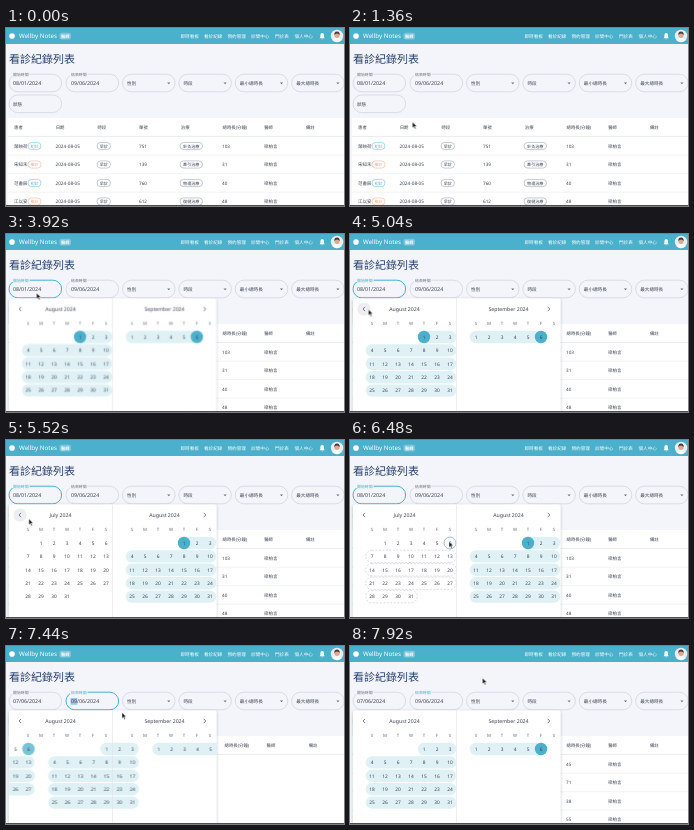
An HTML page that plays this animation: 338x178 px, repeating every 8000 ms.

```html
<!DOCTYPE html>
<html lang="zh-Hant">
<head>
<meta charset="utf-8">
<title>看診紀錄列表</title>
<style>
  html, body { margin: 0; width: 100%; height: 100%; overflow: hidden; background: #f3f5fa; }
  svg { display: block; width: 100vw; height: 100vh; }
  text {
    font: 4.6px "Noto Sans", "Noto Sans CJK TC", "Noto Sans CJK SC", sans-serif;
    fill: #3b4252;
    text-rendering: geometricPrecision;
  }
  .mid { text-anchor: middle; }
  .anim { animation: 8s linear infinite; }

  .popup { animation-name: popup; transform-origin: 106px 64px; }
  @keyframes popup {
    0%, 46.1% { opacity: 0; transform: scale(.75, .56); animation-timing-function: ease-out; }
    49.2%, 100% { opacity: 1; transform: none; }
  }
  /* Month change: 375 ms slide by one panel width */
  .strip { animation-name: strip; }
  @keyframes strip {
    0%, 64% { transform: none; animation-timing-function: cubic-bezier(.35, .8, .4, 1); }
    68.7%, 91.31% { transform: translateX(104px); animation-timing-function: cubic-bezier(.35, .8, .4, 1); }
    96%, 100% { transform: none; }
  }
  .picked { animation-name: picked; }
  @keyframes picked {
    0%, 91.2% { opacity: 0; }
    93%, 94% { opacity: .7; }
    97%, 100% { opacity: 1; }
  }
  .cursor { animation-name: cursor; animation-timing-function: ease-in-out; }
  @keyframes cursor {
    0%, 13% { transform: translate(84px, 154px); }
    17%, 18.5% { transform: translate(62.5px, 94px); }
    23%, 25% { transform: translate(42px, 66px); }
    28%, 31% { transform: translate(39px, 55px); }
    35%, 37% { transform: translate(40px, 55px); }
    40%, 46% { transform: translate(33px, 55px); }
    56% { transform: translate(20px, 76px); }
    59%, 67% { transform: translate(18.5px, 75.5px); }
    71% { transform: translate(27px, 82px); }
    80.5%, 90.5% { transform: translate(99px, 101.5px); }
    93%, 94% { transform: translate(116px, 66.5px); }
    98.5%, 100% { transform: translate(132.5px, 32px); }
  }
</style>
</head>
<body>
<script>
const TEAL = '#4bb0cb', PALE = '#e0f1f6', LINE = '#c6ccd6', NAVY = '#263f6d';
const LOOP = 8000;
let rules = '', ruleCount = 0;

const text = (x, y, s, style = '', cls = '') =>
  `<text x="${x}" y="${y}" class="${cls}" style="${style}">${s}</text>`;
const box = (x, y, w, h, r, attrs) =>
  `<rect x="${x}" y="${y}" width="${w}" height="${h}" rx="${r}" ${attrs}/>`;
const dot = (x, y, r, attrs) => `<circle cx="${x}" cy="${y}" r="${r}" ${attrs}/>`;
const path = (d, attrs) => `<path d="${d}" ${attrs}/>`;
const stroke = (color, w = .6) => `fill="none" stroke="${color}" stroke-width="${w}"`;

// Wraps content so that it shows only from a to b (ms)
function during(a, b, content) {
  const name = 'show' + ruleCount++;
  const pct = t => (t / LOOP * 100).toFixed(2) + '%';
  rules += `@keyframes ${name} {
    0% { opacity: ${a > 0 ? 0 : 1}; }
    ${a > 0 ? `${pct(a)} { opacity: 1; }` : ''}
    ${b < LOOP ? `${pct(b)} { opacity: 0; }` : ''}
    100% { opacity: ${b < LOOP ? 0 : 1}; } }\n`;
  return `<g style="animation: ${name} ${LOOP}ms step-end infinite">${content}</g>`;
}

// Key moments
const HOVER = 2040, FOCUS = 3000, OPEN = 3690, BACK = 5120, PREVIEW = 6360, PICK = 7300, LOADED = 7660;

function header() {
  const nav = [[174.5, '即時看板'], [198, '看診紀錄'], [221.5, '預約管理'],
    [245, '診間中心'], [269, '門診表'], [288.5, '個人中心']];
  const white = 'fill: #fff';
  return box(0, 0, 338, 16, 0, `fill="${TEAL}"`) +
    dot(6, 8, 2.8, 'fill="#fff"') +
    text(13, 10.4, 'Wellby Notes', white + '; font-size: 6.2px') +
    box(53.5, 4.7, 11.5, 6.8, 1.8, 'fill="#fff" fill-opacity=".28"') +
    text(55, 9.6, '醫師', white + '; font-size: 4.2px; font-weight: 700') +
    nav.map(([x, s]) => text(x, 9.8, s, white)).join('') +
    path('M313.6 10.2h5.2l-.8-1.1v-2a1.8 2 0 0 0-3.6 0v2zM315.5 10.7h1.4l-.7.7z', 'fill="#fff"') +
    dot(331, 8, 6.2, 'fill="#e6f0f5"') +
    path('M326.6 12.3q.6-2.6 4.4-2.6t4.4 2.6a6.2 6.2 0 0 1-8.8 0', 'fill="#fff"') +
    dot(331, 7.3, 2.6, 'fill="#dfab8e"') +
    path('M328.3 6.9q-.2-3.5 2.7-3.5t2.7 3.5q-1.2-1.5-2.7-1.5t-2.7 1.5', 'fill="#4a3a38"');
}

const field = (x, y, color = LINE, w = .6) => box(x, y, 52.6, 17.6, 8.8, stroke(color, w));
const label = (x, s, color) =>
  box(x - 1, 44, 17.6, 4, 0, 'fill="#f3f5fa"') + text(x, 48, s, `font-size: 3.9px; fill: ${color}`);
const date = (x, s) => text(x, 57.2, s, 'font-size: 5.3px');

function select(x, s) {
  return field(x, 46.2) + text(x + 4.6, 57, s) +
    path(`M${x + 44.7} 54.6h3.2l-1.6 1.7z`, 'fill="#68707d"');
}

function filters() {
  const start = (color, w) => field(3, 46.2, color, w) + label(7, '開始時間', color === TEAL ? TEAL : '#6b7280');
  const end = (border, color, w) => field(60, 46.2, border, w) + label(65, '結束時間', color);
  return during(0, HOVER, start(LINE)) +
    during(HOVER, FOCUS, start('#59606c')) +
    during(FOCUS, PICK, start(TEAL, 1)) +
    during(PICK, LOOP, start(LINE)) +
    during(0, PICK, end(LINE, '#6b7280') + date(7, '08/01/2024')) +
    during(PICK, LOADED, end(TEAL, TEAL, 1) + box(64.5, 52, 6.8, 6.8, 0, 'fill="#9ec4ec"')) +
    during(LOADED, LOOP, end(LINE, TEAL)) +
    during(PICK, LOOP, date(7, '07/06/2024')) +
    date(65, '09/06/2024') +
    select(116.5, '性別') + select(172.8, '時段') + select(229.2, '最小總時長') + select(285.6, '最大總時長') +
    field(3, 67) + text(7, 77.6, '狀態');
}

function tag(x, y, s, w, color, ink = color) {
  return box(x, y - 3.6, w, 7.2, 3.6, stroke(color, .5)) +
    text(x + w / 2, y + 1.5, s, `font-size: 4.1px; fill: ${ink}`, 'mid');
}

const heads = ['患者', '日期', '時段', '單號', '治療', '總時長(分鐘)', '醫師', '備註'];
const tableHead = step => heads.map((s, i) => text(8 + i * step, 101, s, 'font-size: 4.4px')).join('');

function rows(data) {
  return data.map(([name, first, no, cure, mins], i) => {
    const y = 118 + i * 18.5;
    return text(8, y + 1.6, name, 'font-size: 4.5px') +
      tag(22, y, first ? '初診' : '複診', 13, first ? '#58b4d0' : '#eda98c') +
      text(49.5, y + 1.7, '2024-08-05', 'font-size: 4.7px') +
      tag(91, y, '早診', 13.5, '#8d96a5', '#3b4252') +
      text(133, y + 1.7, no) +
      tag(174, y, cure, 22.5, '#8d96a5', '#3b4252') +
      text(216, y + 1.7, mins) + text(258, y + 1.6, '梁柏言', 'font-size: 4.5px') +
      path(`M2 ${y + 9.2}H338`, stroke('#e3e6ec', .5));
  }).join('');
}

function table() {
  const before = [['葉映荷', 1, 751, '針灸治療', 103], ['宋知禾', 0, 139, '牽引治療', 31],
    ['范書辰', 1, 760, '物理治療', 40], ['江以安', 0, 612, '復健治療', 48]];
  const after = [['江以安', 0, 418, '復健治療', 45], ['葉映荷', 1, 226, '針灸治療', 71],
    ['宋知禾', 0, 534, '牽引治療', 38], ['范書辰', 1, 307, '物理治療', 55]];
  return box(2, 90, 336, 88, 0, 'fill="#fff"') +
    path('M2 108.4H338', stroke('#d9dde4', .6)) +
    during(0, PICK, tableHead(41.7) + rows(before)) +
    during(PICK, LOADED, tableHead(42.1)) +
    during(LOADED, LOOP, tableHead(41.7) + rows(after));
}

const colX = c => 22 + c * 13;
const rowY = r => 103 + r * 13.4;
// First weekday, length and horizontal offset of each month
const months = { jul: [1, 31, -104], aug: [4, 31, 0], sep: [0, 30, 104] };

function place([first, , dx], day) {
  const n = first + day - 1;
  return [colX(n % 7) + dx, rowY(Math.floor(n / 7))];
}

// One shape per week for the days from a to b
function weeks(month, a, b, draw) {
  let out = '';
  for (let d = a; d <= b;) {
    const left = 6 - (month[0] + d - 1) % 7;
    const last = Math.min(b, d + left);
    const [x, y] = place(month, d);
    out += draw(x - 6.3, y, (last - d) * 13 + 12.6);
    d = last + 1;
  }
  return out;
}
const band = (x, y, w) => box(x, y - 6.2, w, 12.4, 6.2, `fill="${PALE}"`);
const dashes = (x, y, w) => box(x, y - 6.2, w, 12.4, 6.2, stroke('#c3c7ce', .6) + ' stroke-dasharray="2 1.5"');

function days(month, from, to) {
  let out = '';
  for (let d = from; d <= to; d++) {
    const [x, y] = place(month, d);
    out += text(x, y + 1.75, d, 'font-size: 4.8px', 'mid');
  }
  return out;
}

function disc(month, day) {
  const [x, y] = place(month, day);
  return dot(x, y, 6.2, `fill="${TEAL}"`);
}

function calendar() {
  const { jul, aug, sep } = months;
  const [hx, hy] = place(jul, 6);
  const titles = (a, b) => text(54.5, 76.9, a, 'font-size: 5.2px', 'mid') + text(158.5, 76.9, b, 'font-size: 5.2px', 'mid');
  const letters = [0, 104].map(dx =>
    [...'SMTWTFS'].map((s, i) => text(colX(i) + dx, 90.6, s, 'font-size: 4.4px; fill: #666d7a', 'mid')).join('')).join('');
  const strip =
    weeks(aug, 1, 31, band) + weeks(sep, 1, 6, band) +
    during(PICK, LOOP, weeks(jul, 6, 31, band)) +
    during(PREVIEW, PICK, weeks(jul, 7, 31, dashes) + dot(hx, hy, 6, 'fill="#f4fafc" stroke="#8fa4af" stroke-width=".7"')) +
    during(0, PICK, disc(aug, 1)) + disc(sep, 6) +
    `<g class="anim picked">${disc(jul, 6)}</g>` +
    days(jul, 1, 31) + days(aug, 1, 31) + days(sep, 1, 6);
  return `<g class="anim popup">` +
    box(3, 64.5, 207.5, 116, 2, 'fill="#fff" filter="url(#shade)"') +
    during(4600, 5700, dot(14, 75, 6.6, 'fill="#eceef1"')) +
    path('M15 72.9l-2 2.1 2 2.1M197.8 72.9l2 2.1-2 2.1', stroke('#59606c', .8)) +
    during(0, BACK, titles('August 2024', 'September 2024')) +
    during(BACK, PICK, titles('July 2024', 'August 2024')) +
    during(PICK, LOOP, titles('August 2024', 'September 2024')) +
    letters +
    `<g clip-path="url(#panel)"><g class="anim strip">${strip}</g></g>` +
    path('M106.5 64.5V178', stroke('#dfe2e8', .6)) + '</g>';
}

function cursor() {
  const arrow = path('M0 0v6l1.4-1.3 1 2.2 1-.5-1-2.1h1.9z', 'fill="#111" stroke="#fff" stroke-width=".5"');
  const beam = 'M-1-3h2M0-3v6M-1 3h2';
  return '<g class="anim cursor">' +
    during(1040, 2200, arrow) +
    during(2200, 3900, path(beam, stroke('#fff', 1.2)) + path(beam, stroke('#222', .7))) +
    during(3900, LOOP, arrow) + '</g>';
}

const scene = `<svg viewBox="0 0 338 178">
  <defs>
    <clipPath id="panel"><rect x="3" y="95" width="207.5" height="83"/></clipPath>
    <filter id="shade" x="-10%" y="-10%" width="120%" height="120%">
      <feDropShadow dx="0" dy="1" stdDeviation="1.6" flood-color="#1b2540" flood-opacity=".3"/>
    </filter>
  </defs>
  ${header()}
  ${text(3, 34.6, '看診紀錄列表', `font-size: 11px; fill: ${NAVY}`)}
  ${filters()}${table()}${calendar()}
  ${box(0, 177, 338, 1, 0, 'fill="#4b4d52"')}
  ${cursor()}
</svg>`;
document.body.innerHTML = `<style>${rules}</style>${scene}`;
</script>
</body>
</html>
```
